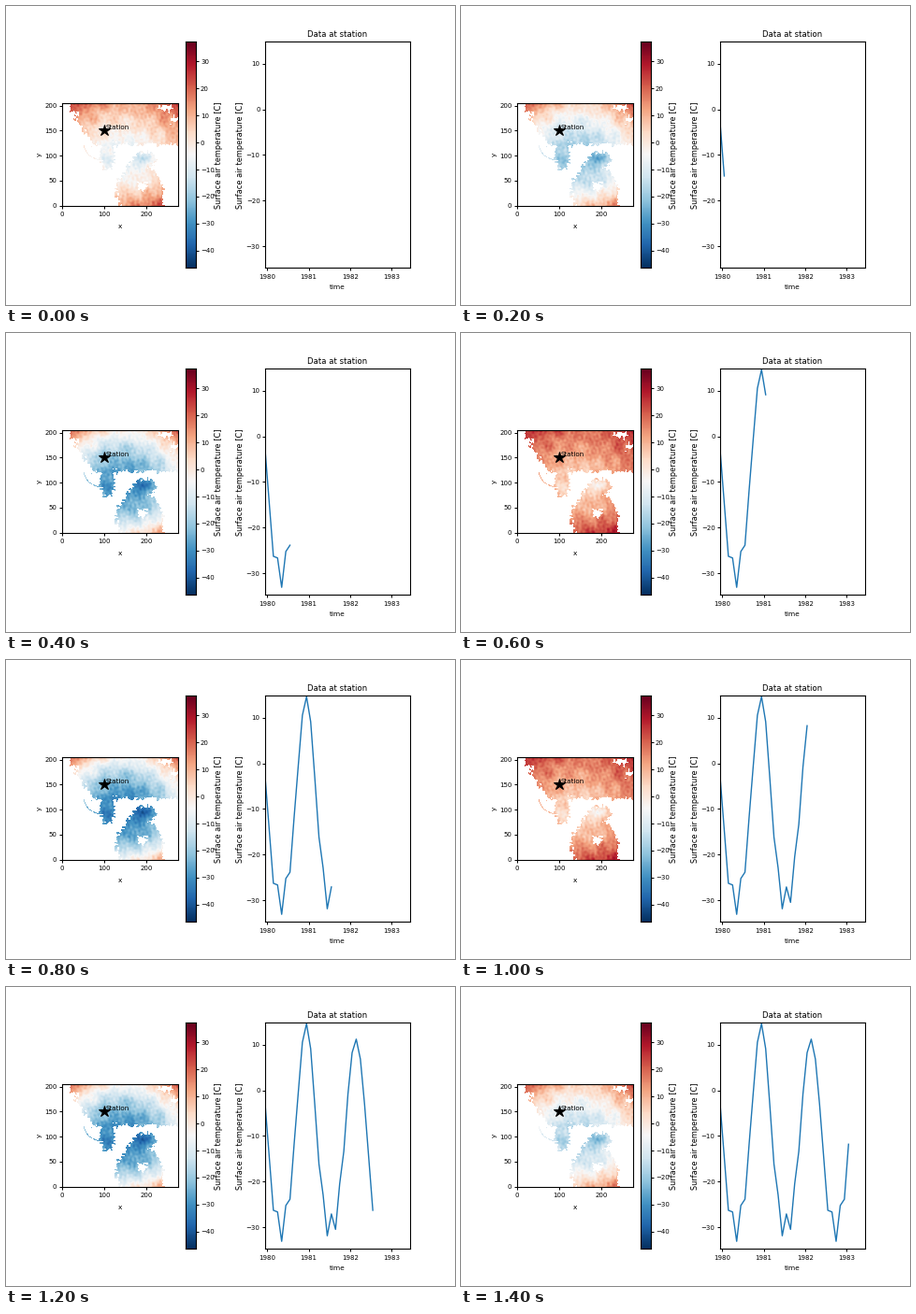
A matplotlib script for the animation above (1600 ms loop, 480x320 px).

```python
import numpy as np
import matplotlib.pyplot as plt
from matplotlib.animation import FuncAnimation

W, H, DPI = 480, 320, 80
PT = 72 / DPI
NX, NY = 275, 205
T_MIN, T_MAX = -46.3, 37.4
MAP_BOX = (60, 104, 184, 213.5)
STEPS = [0, *range(1, 36, 5)]

plt.rcParams.update({"font.family": "DejaVu Sans", "axes.linewidth": 1.1 * PT,
                     "image.cmap": "RdBu_r"})


def station_series(month):
    """Yearly cycle with a winter zigzag and alternating summer peaks."""
    angle = 2 * np.pi * (month - 10) / 12
    year = month // 12
    warm = (1 + np.cos(angle)) / 2
    cycle = (-11.3 + 21.5 * np.cos(angle) + 2.7 * np.cos(2 * angle)
             - 1.4 * np.sin(angle))
    zigzag = -3 * (-1.0) ** (month + year) * (1 - warm) ** 2
    return cycle + zigzag + 1.7 * (-1.0) ** year * warm ** 6


station = station_series(np.arange(36))

x0, y0, x1, y1 = MAP_BOX
gx, gy = np.meshgrid(x0 + (np.arange(NX) + 0.5) * (x1 - x0) / NX,
                     y1 - (np.arange(NY) + 0.5) * (y1 - y0) / NY)


def ripple(seed, low, high, count=14):
    """Smooth seeded noise made of plane waves."""
    rng = np.random.default_rng(seed)
    total = np.zeros_like(gx)
    for _ in range(count):
        angle, phase = rng.uniform(0, 2 * np.pi, 2)
        k = rng.uniform(low, high)
        total += np.sin(k * (gx * np.cos(angle) + gy * np.sin(angle)) + phase)
    return total / np.sqrt(count / 2)


# Ragged coasts: simple shapes tested at rippled coordinates.
wx = gx + 1.3 * ripple(1, 0.3, 1.8)
wy = gy + 1.3 * ripple(2, 0.3, 1.8)


def blob(cx, cy, rx, ry):
    return np.hypot((wx - cx) / rx, (wy - cy) / ry) < 1


def make_land():
    land = (wx > 68) & (wy < 148) & (wy < 112 + 1.4 * (wx - 68))
    land |= blob(108, 159, 8, 16)       # cape
    land |= blob(143, 198, 25, 27) | ((wy > 198) & (abs(wx - 145) < 23))
    land |= blob(148, 164, 12, 9)       # ice-covered island
    land |= blob(136, 175, 8, 8)        # archipelago
    for lake in [(146, 192, 5, 5), (126, 150, 7, 3), (170, 109, 8, 3),
                 (180, 122, 4, 3), (72, 116, 5, 3)]:
        land &= ~blob(*lake)
    arc = abs(np.hypot(gx - 101, gy - 146) - 18) < 0.4
    return land | (arc & (gx < 101) & (gy > 146))


land = make_land()
radius = np.hypot((gx - 125) / 62, (gy - 162) / 55)
relief = 1.5 * ripple(3, 0.15, 0.5) + 1.2 * ripple(4, 0.7, 1.6)
south = 5 * np.clip((gy - 188) / 20, 0, 1)
ice = 13 * np.exp(-((gx - 148) / 8) ** 2 - ((gy - 163) / 5.5) ** 2)
summer = 2 + 17 * radius
winter = -36 + 29 * radius ** 2


def air_field(month):
    warmth = np.clip((station[month] + 30) / 40, 0, 1)
    temp = warmth * summer + (1 - warmth) * winter + south - ice + relief
    return np.ma.masked_where(~land, temp)


fig = plt.figure(figsize=(W / DPI, H / DPI), dpi=DPI, facecolor="white")


def add_axes(left, top, right, bottom):
    ax = fig.add_axes([left / W, 1 - bottom / H,
                       (right - left) / W, (bottom - top) / H])
    ax.tick_params(length=3 * PT, width=PT, labelsize=7 * PT)
    ax.tick_params(axis="x", pad=3.5 * PT)
    ax.tick_params(axis="y", pad=2.5 * PT)
    return ax


def label(x, y, text, size, **kw):
    kw = {"ha": "center", "va": "center", **kw}
    fig.text(x / W, 1 - y / H, text, fontsize=size * PT, **kw)


map_ax = add_axes(*MAP_BOX)
image = map_ax.imshow(air_field(0), vmin=T_MIN, vmax=T_MAX, origin="lower",
                      extent=(0, NX, 0, NY), aspect="auto",
                      interpolation="nearest")
map_ax.set_xticks([0, 100, 200])
map_ax.set_yticks(range(0, 201, 50))
map_ax.plot(100, 150, "*", color="black", markersize=12 * PT)
map_ax.text(104, 152, "Station", fontsize=7.1 * PT, va="baseline")

bar_ax = add_axes(191.5, 38, 202.5, 280)
bar_ax.imshow(np.linspace(0, 1, 256)[:, None], origin="lower",
              extent=(0, 1, T_MIN, T_MAX), aspect="auto")
bar_ax.set_xticks([])
bar_ax.yaxis.tick_right()
bar_ax.set_yticks(range(-40, 31, 10))

line_ax = add_axes(277, 38, 432, 280)
line_ax.set(xlim=(0, 35), ylim=(-34.7, 14.85))
line_ax.set_xticks(0.5 + 10 * np.arange(4), range(1980, 1984))
line_ax.set_yticks(range(-30, 11, 10))
curve, = line_ax.plot([], [], color="C0", linewidth=1.4 * PT)

label(122, 235.5, "x", 7.4)
label(35.5, 159, "y", 7.4, rotation=90)
for x in (227.5, 250.5):
    label(x, 159.5, "Surface air temperature [C]", 8.2, rotation=90)
label(354.5, 301, "time", 7.4)
label(354.5, 33, "Data at station", 8.5, va="baseline")


def draw(frame):
    month = STEPS[frame]
    image.set_data(air_field(month))
    curve.set_data(np.arange(month + 1), station[:month + 1])
    return image, curve


anim = FuncAnimation(fig, draw, frames=len(STEPS), interval=200,
                     repeat=True, repeat_delay=0, blit=False)
plt.show()
```
